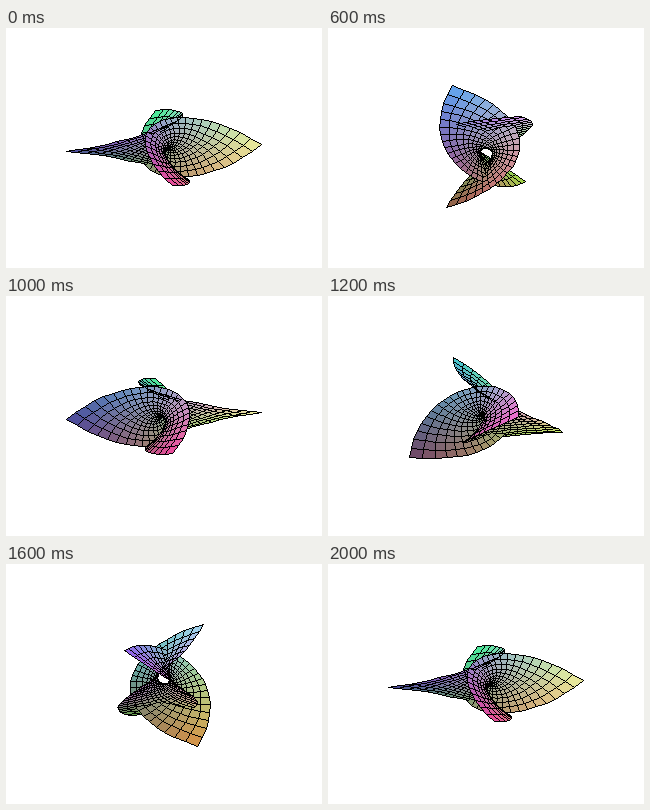
These frames come from a looping animation (316 by 240 pixels, 2100 ms). A matplotlib script:

```python
import numpy as np
import matplotlib.pyplot as plt
from matplotlib.animation import FuncAnimation

W, H, DPI = 316, 240, 100
STEPS = 20                      # steps per turn; the end pose repeats the first
CELLS = 24
AZIM = np.radians(50)
TILT = np.radians(67.2)
SCALE, Z_SCALE = 9.44, 0.707
CENTER = (158, 120)

# Enneper's surface as the real part of a complex curve
t = np.linspace(-2, 2, CELLS + 1)
u, v = np.meshgrid(t, t)
w = u + 1j * v
CURVE = np.stack([w - w**3 / 3, 1j * (w + w**3 / 3), w**2], axis=-1)


def quads(p):
    """Corner lists of all grid cells, shape (cells, 4, 3)."""
    q = np.stack([p[:-1, :-1], p[:-1, 1:], p[1:, 1:], p[1:, :-1]], axis=2)
    return q.reshape(-1, 4, 3)


def project(p):
    """Screen pixel (x, y) of each point and its nearness to the viewer."""
    x, y, z = p[..., 0], p[..., 1], p[..., 2] * Z_SCALE
    side = x * np.sin(AZIM) - y * np.cos(AZIM)
    front = x * np.cos(AZIM) + y * np.sin(AZIM)
    down = front * np.cos(TILT) - z * np.sin(TILT)
    near = front * np.sin(TILT) + z * np.cos(TILT)
    pixel = np.stack([CENTER[0] + SCALE * side, CENTER[1] + SCALE * down], axis=-1)
    return np.floor(pixel).astype(int), near


def shade(p):
    """Colour by position: x to red, -y to green, z to blue."""
    return np.clip(0.61 + 0.36 * p * [1, -1, 1] / 8, 0, 1)


def edges(corners):
    return zip(corners, corners[1:] + corners[:1])


def fill(img, corners, color):
    """Even-odd fill of a small polygon."""
    xs, ys = zip(*corners)
    x0, x1, y0, y1 = min(xs), max(xs) + 1, min(ys), max(ys) + 1
    px = np.arange(x0, x1)
    py = np.arange(y0, y1)[:, None]
    inside = np.zeros((y1 - y0, x1 - x0), bool)
    for (ax_, ay), (bx, by) in edges(corners):
        if ay != by:
            spans = (ay > py) != (by > py)
            inside ^= spans & (px < ax_ + (py - ay) * (bx - ax_) / (by - ay))
    img[y0:y1, x0:x1][inside] = color


def line(img, a, b):
    """One-pixel black line without smoothing."""
    (x0, y0), (x1, y1) = sorted((a, b))
    n = max(abs(x1 - x0), abs(y1 - y0), 1)
    s = np.arange(n + 1) / n
    cols = np.floor(x0 + (x1 - x0) * s + 0.5).astype(int)
    rows = np.floor(y0 + (y1 - y0) * s + 0.5).astype(int)
    img[rows, cols] = 0


def render(i):
    """Paint the cells from back to front."""
    img = np.ones((H, W, 3))
    angle = 2 * np.pi * i / STEPS
    cells = quads((np.exp(-1j * angle) * CURVE).real)
    pixels, near = project(cells)
    colors = shade(cells.mean(axis=1))
    for k in np.argsort(near.mean(axis=1)):
        corners = [tuple(c) for c in pixels[k].tolist()]
        fill(img, corners, colors[k])
        for a, b in edges(corners):
            line(img, a, b)
    return img


fig = plt.figure(figsize=(W / DPI, H / DPI), dpi=DPI, facecolor="white")
ax = fig.add_axes([0, 0, 1, 1])
ax.axis("off")
picture = ax.imshow(render(0), interpolation="nearest", aspect="auto")


def update(i):
    picture.set_data(render(i))
    return (picture,)


anim = FuncAnimation(fig, update, frames=STEPS + 1, interval=100,
                     init_func=lambda: update(0), repeat=True, repeat_delay=0)
plt.show()
```
